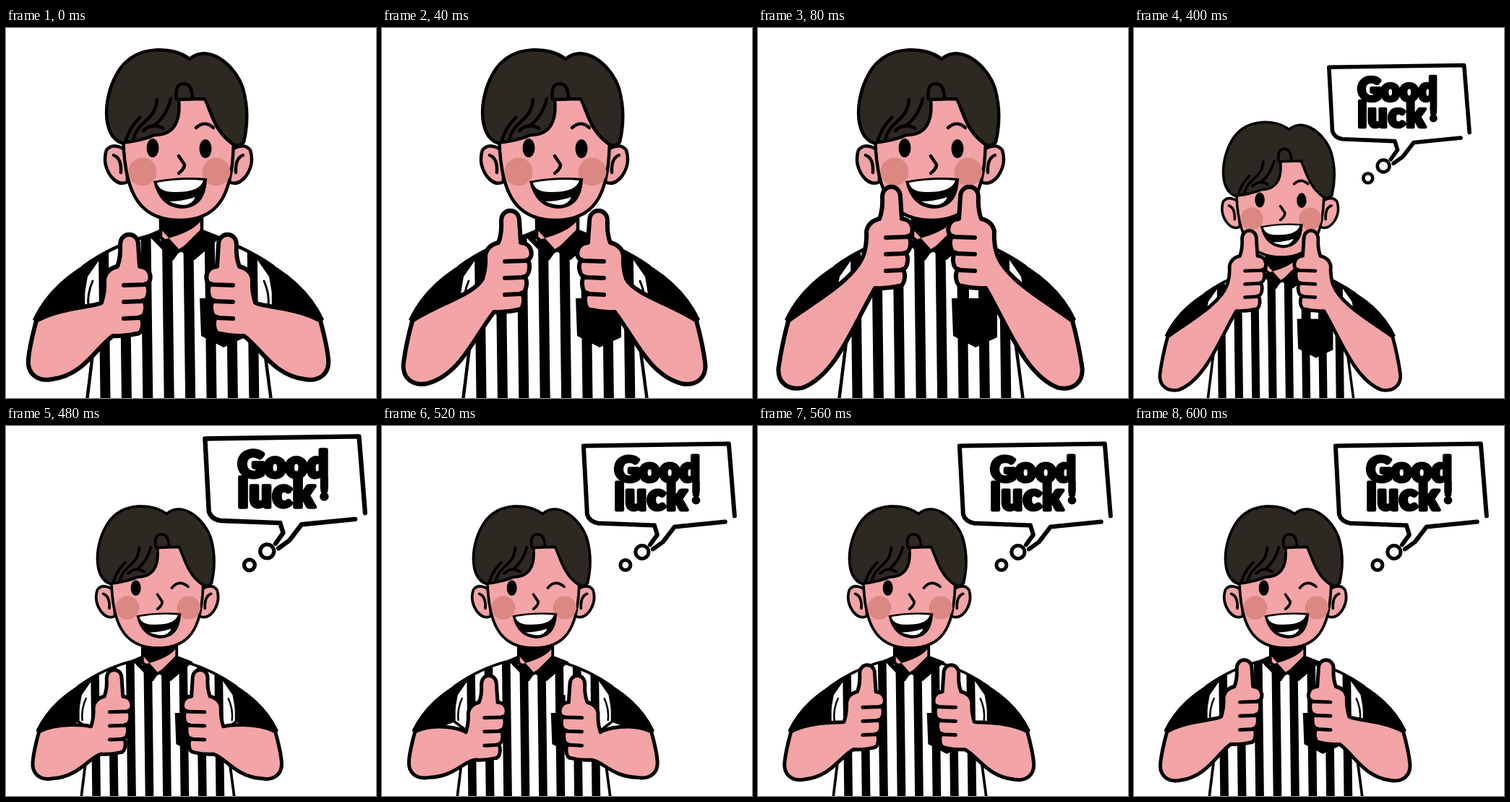
An HTML page that plays this animation: 512x512 px, repeating every 2000 ms.

```html
<!DOCTYPE html>
<html lang="en">
<head>
<meta charset="utf-8">
<title>Good luck!</title>
<style>
html, body { margin: 0; height: 100%; overflow: hidden; background: #fff; }
svg { display: block; width: 100vw; height: 100vh; }
.line, .skin { fill: none; stroke: #000; stroke-width: 4.5; stroke-linecap: round; stroke-linejoin: round; }
.skin { fill: #f2a4a7; }
.flip { transform: matrix(-1, 0, 0, 1, 477, 0); }
text { font: 900 48px Lato, sans-serif; stroke: #000; stroke-width: 5; stroke-linejoin: round; }
</style>
</head>
<body>
<svg viewBox="0 0 512 512">
  <defs>
    <path id="torso" d="M112 516L126 402 107 388V330Q150 299 200 287H277Q325 299 370 330V388L352 402 367 516Z"/>
    <clipPath id="clip"><use href="#torso"/></clipPath>
  </defs>

  <g id="figure">
    <!-- shirt -->
    <path id="stripes" class="line" style="stroke-width:14" clip-path="url(#clip)"/>
    <use href="#torso" class="line"/>
    <g id="sleeve">
      <path d="M37 403Q64 346 134 314L113 344 105 390 44 412Z"/>
      <path class="line" style="stroke-width:3" d="M120 350Q112 368 114 386"/>
    </g>
    <use href="#sleeve" class="flip"/>
    <path d="M268 374H331V428L301 442 270 426ZM277 344H292V376H277Z"/>

    <!-- neck and collar -->
    <path class="skin" d="M214 260V290L239 309 271 288V260Z"/>
    <path d="M212 262H273Q262 283 213 294ZM214 278L196 286 231 322 241 308ZM270 278L240 308 261 321 298 289Z"/>

    <!-- head -->
    <g id="ear">
      <path class="skin" d="M167 170Q148 157 139 169 133 188 145 205 156 219 168 213Z"/>
      <path class="line" d="M149 176Q160 180 159 200"/>
    </g>
    <use href="#ear" class="flip"/>
    <path class="skin" d="M162 140C162 222 180 266 240 266S315 222 315 150L280 90H230Z"/>
    <g fill="#dc8882"><circle cx="189" cy="199" r="19.5"/><circle cx="291" cy="199" r="19.5"/></g>
    <path class="line" style="fill:#2d2822" d="M160 159C132 150 133 92 158 56C182 23 232 25 254 43C280 20 318 52 328 84Q338 120 329 158 322 166 313 160C288 142 284 116 275 98L239 99C242 130 232 148 206 148Q188 156 160 159Z"/>
    <path class="line" d="M236 98Q233 77 246 77 257 77 258 96M209 99C206 130 184 126 176 154M228 98Q222 122 205 135M185 124Q171 138 166 155M190 142Q203 130 217 139"/>
    <ellipse cx="203" cy="166" rx="8.5" ry="13"/>
    <g id="open">
      <ellipse cx="276" cy="167" rx="8.5" ry="13"/>
      <path class="line" d="M263 138Q275 127 287 138"/>
    </g>
    <path id="wink" class="line" d="M263 166Q275 151 290 164"/>
    <path class="line" d="M239 177L247 189Q247 195 239 201"/>
    <path d="M204 212Q240 205 278 208 277 249 243 250 212 248 204 212Z"/>
    <path fill="#fff" d="M209 214Q240 208 273 211 268 227 236 227 212 228 209 214ZM226 240Q244 240 262 234 254 252 226 240Z"/>

    <path id="arm" class="skin" style="stroke-width:6"/>
    <use href="#arm" class="flip"/>
  </g>

  <!-- bubble, drawn around its smallest circle -->
  <g id="bubble">
    <path class="line" style="stroke-width:6" d="M40 -55L-38 -58Q-50 -60 -53 -70L-58 -165 143 -168 151 -68M138 -60L68 -53 52 -32 38 -22M40 -55L44 -42 34 -28"/>
    <g fill="#fff" stroke="#000" stroke-width="5"><circle cx="23" cy="-18" r="9"/><circle r="7"/></g>
    <g transform="translate(-15 -115)">
      <text>Good</text>
      <text y="39" style="font-size:51px;letter-spacing:1.5px">luck</text>
      <text x="107" y="29" style="font-size:38px">!</text>
    </g>
  </g>
</svg>
<script>
const el = id => document.getElementById(id);
const show = (id, on) => el(id).style.display = on ? "" : "none";

let stripes = "";
for (let i = -3.5; i < 4; i++) stripes += `M${240.5 + 29.4 * i} 520L${237.5 + 29.4 * i} 280`;
el("stripes").setAttribute("d", stripes);

// Each point follows the hand by its weight; the elbow sinks a little.
function armPath(lift) {
  const at = (weight, ...xy) =>
    xy.map((v, i) => v + (i % 2 ? -66 : 14) * weight * lift).join(" ") + " ";
  const hand = (...xy) => at(1, ...xy);
  const cuff = at(0, 42, 405);

  let d = "M" + cuff + "C" + at(.1, 75, 386) + at(.55, 125, 386) + hand(132, 380) +
    "Q" + hand(137, 365, 136, 348, 138, 334, 154, 330, 159, 318, 158, 300) +
    "C" + hand(158, 281, 183, 281, 183, 300) + "L" + hand(185, 330);
  let creases = "";
  for (let i = 0; i < 4; i++) {
    const x = 194 - 4 * i, y = 331 + 23 * i;
    d += "C" + hand(x + 9, y, x + 9, y + 23, x - 1, y + 23);
    if (i < 3) creases += "M" + hand(163, y + 25) + "L" + hand(x - 1, y + 24);
  }
  d += "Q" + hand(165, 427, 148, 426) +
    "C" + at(.45, 125, 442) + at(0, 108, 480) + at(-.18, 64, 486) +
    "C" + at(-.18, 43, 490, 29, 478, 31, 458) + "Q" + at(0, 33, 438) + cuff + "Z";
  return d + creases;
}

function draw(now) {
  const t = Math.floor(now % 2000 / 40) * 40;
  const after = t - 400, talking = after >= 0, small = after < 40;
  const u = Math.min(after / 200, 1);

  // thumbs rise, then swing back with a damped bounce
  const lift = talking ? (1 - u) * Math.cos(5 * u) : Math.min(t / 80, 1);
  const scale = !talking ? 1 : small ? .792 : .832;
  const size = small ? .93 : 1 + .12 * Math.max(0, 1 - (after - 40) / 80);
  const x = 64 * (1 - scale), y = 511.5 * (1 - scale);

  el("figure").setAttribute("transform", `translate(${x} ${y}) scale(${scale})`);
  el("bubble").setAttribute("transform", `translate(${x + 392 * scale} ${y + 128 * scale}) scale(${size})`);
  el("arm").setAttribute("d", armPath(lift));
  show("bubble", talking);
  show("wink", talking && !small);
  show("open", !talking || small);
}

let begin;
function tick(now) {
  begin ??= now;
  draw(now - begin);
  requestAnimationFrame(tick);
}
draw(0);
requestAnimationFrame(tick);
</script>
</body>
</html>
```
